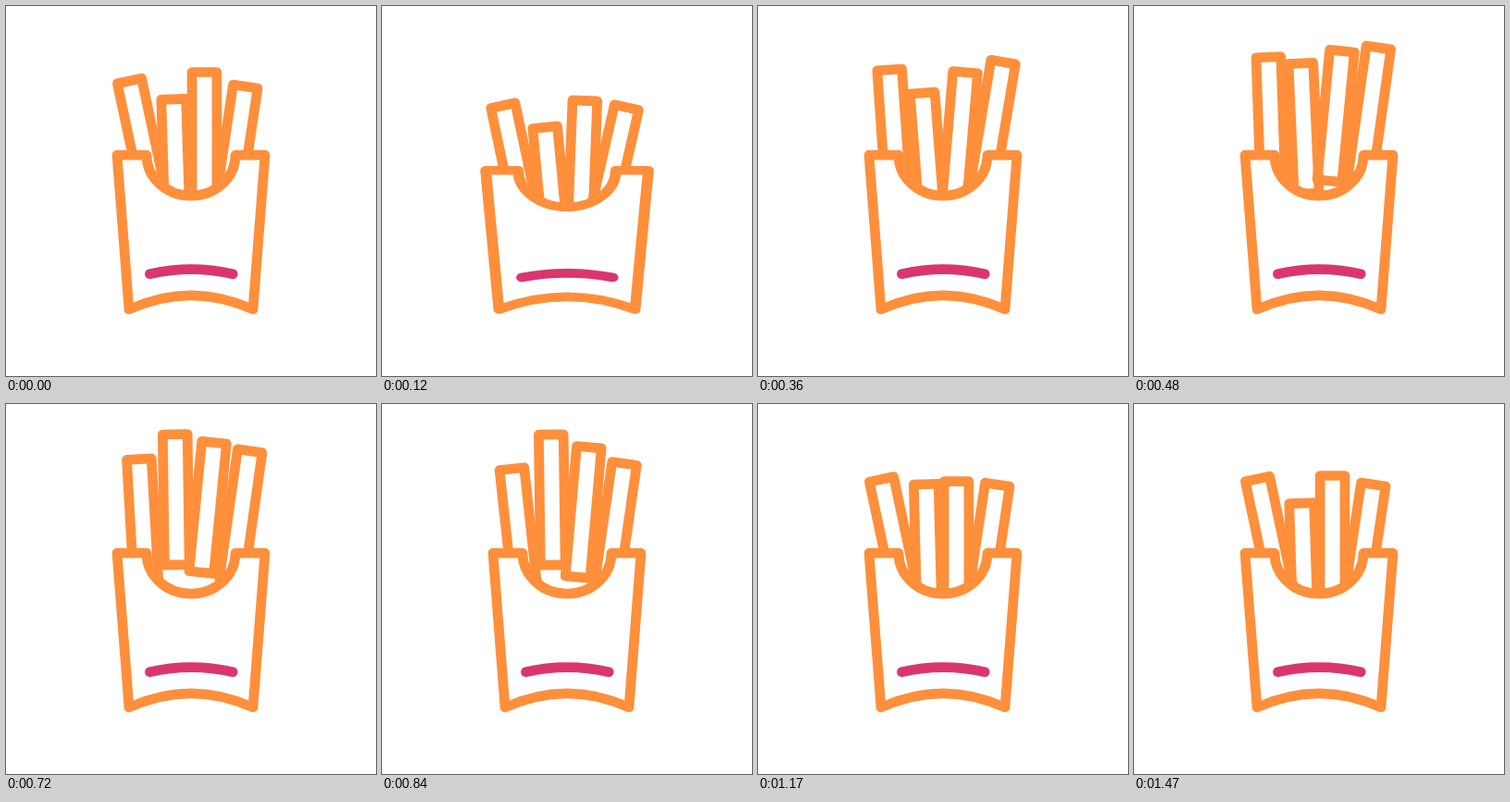
These frames come from a looping animation (400x400 px, 3.86 s). An HTML page with a canvas:

```html
<!DOCTYPE html>
<html lang="en">
<head>
<meta charset="utf-8">
<title>Fries</title>
<style>
html, body { margin: 0; width: 100%; height: 100%; overflow: hidden; background: #fff; }
canvas { display: block; width: 100vw; height: 100vh; }
</style>
</head>
<body>
<canvas id="stage"></canvas>
<script>
const LOOP = 3860, STEP = 30, SIZE = 400;
const ORANGE = '#ff8f3b', PINK = '#db356e';
const FRY_W = 26.8, FRY_H = 141, LINE = 10.7;

// Timing of one jump, before each fry's own delay
const DIP = 210, PEAK = 480, LAND = 960, SETTLE = 240, SQUASH = 261;

const canvas = document.getElementById('stage');
const ctx = canvas.getContext('2d');

// Poses are [top centre x, top centre y, tilt in degrees].
// lift: height above rest at the start, sink: depth below rest on landing
const fries = [
  { delay: 0, lift: 0, sink: 9.5, rest: [133.5, 81, -12], dip: [129.1, 124.5, -12], peak: [145.4, 55.3, -2] },
  { delay: 270, lift: 6.5, sink: 6, rest: [181.2, 107.3, -1.8], dip: [173, 150.5, -7.8], peak: [182.8, 32.5, -0.8] },
  { delay: 120, lift: 6, sink: 9, rest: [214.5, 77.5, 0], dip: [222.4, 122, 3.5], peak: [225.2, 41, 5.7] },
  { delay: 0, lift: 0, sink: 4, rest: [258.8, 87, 8.5], dip: [267.9, 124, 15.5], peak: [264.4, 45, 8] }
];

const smooth = u => (1 - Math.cos(Math.PI * u)) / 2;
const rise = u => 1 - (1 - u) ** 2;
const fall = u => u ** 3;
const mix = (a, b, u) => a.map((v, i) => v + (b[i] - v) * u);
const shift = ([x, y, tilt], dy) => [x, y + dy, tilt];

function fryPose({ delay, lift, sink, rest, dip, peak }, t) {
  const top = PEAK + delay, land = LAND + delay;
  const low = shift(rest, sink);
  if (t < DIP) return mix(shift(rest, -lift), dip, smooth(t / DIP));
  if (t < top) return mix(dip, peak, rise((t - DIP) / (top - DIP)));
  if (t < land) return mix(peak, low, fall((t - top) / (land - top)));
  return mix(low, rest, smooth(Math.min(1, (t - land) / SETTLE)));
}

function drawFry([x, y, tilt]) {
  ctx.save();
  ctx.translate(x, y);
  ctx.rotate(tilt * Math.PI / 180);
  ctx.strokeRect(-FRY_W / 2, 0, FRY_W, FRY_H);
  ctx.restore();
}

function drawBox(t) {
  const k = t < SQUASH ? 0.1 * Math.sin(Math.PI * t / SQUASH) : 0;
  ctx.save();
  ctx.translate(200, 328);
  ctx.scale(1 + k, 1 - k);
  ctx.translate(-200, -328);

  ctx.beginPath();
  ctx.moveTo(120, 161.2);
  ctx.lineTo(152, 161.2);
  ctx.ellipse(200, 161.2, 48, 44, 0, Math.PI, 0, true);
  ctx.lineTo(280, 161.2);
  ctx.lineTo(267, 328);
  ctx.quadraticCurveTo(200, 297.6, 133, 328);
  ctx.closePath();
  ctx.fillStyle = '#fff';
  ctx.fill();
  ctx.stroke();

  ctx.beginPath();
  ctx.moveTo(155.4, 289.7);
  ctx.quadraticCurveTo(200, 279.5, 245.2, 289.7);
  ctx.strokeStyle = PINK;
  ctx.stroke();
  ctx.restore();
}

function draw(t) {
  const w = Math.round(innerWidth * devicePixelRatio);
  const h = Math.round(innerHeight * devicePixelRatio);
  if (canvas.width !== w || canvas.height !== h) {
    canvas.width = w;
    canvas.height = h;
  }
  ctx.setTransform(w / SIZE, 0, 0, h / SIZE, 0, 0);
  ctx.fillStyle = '#fff';
  ctx.fillRect(0, 0, SIZE, SIZE);
  ctx.lineWidth = LINE;
  ctx.lineCap = ctx.lineJoin = 'round';
  ctx.strokeStyle = ORANGE;
  for (const fry of fries) drawFry(fryPose(fry, t));
  drawBox(t);
}

const start = performance.now();
function tick() {
  const t = (performance.now() - start) % LOOP;
  draw(Math.floor(t / STEP) * STEP);
  requestAnimationFrame(tick);
}
tick();
</script>
</body>
</html>
```
